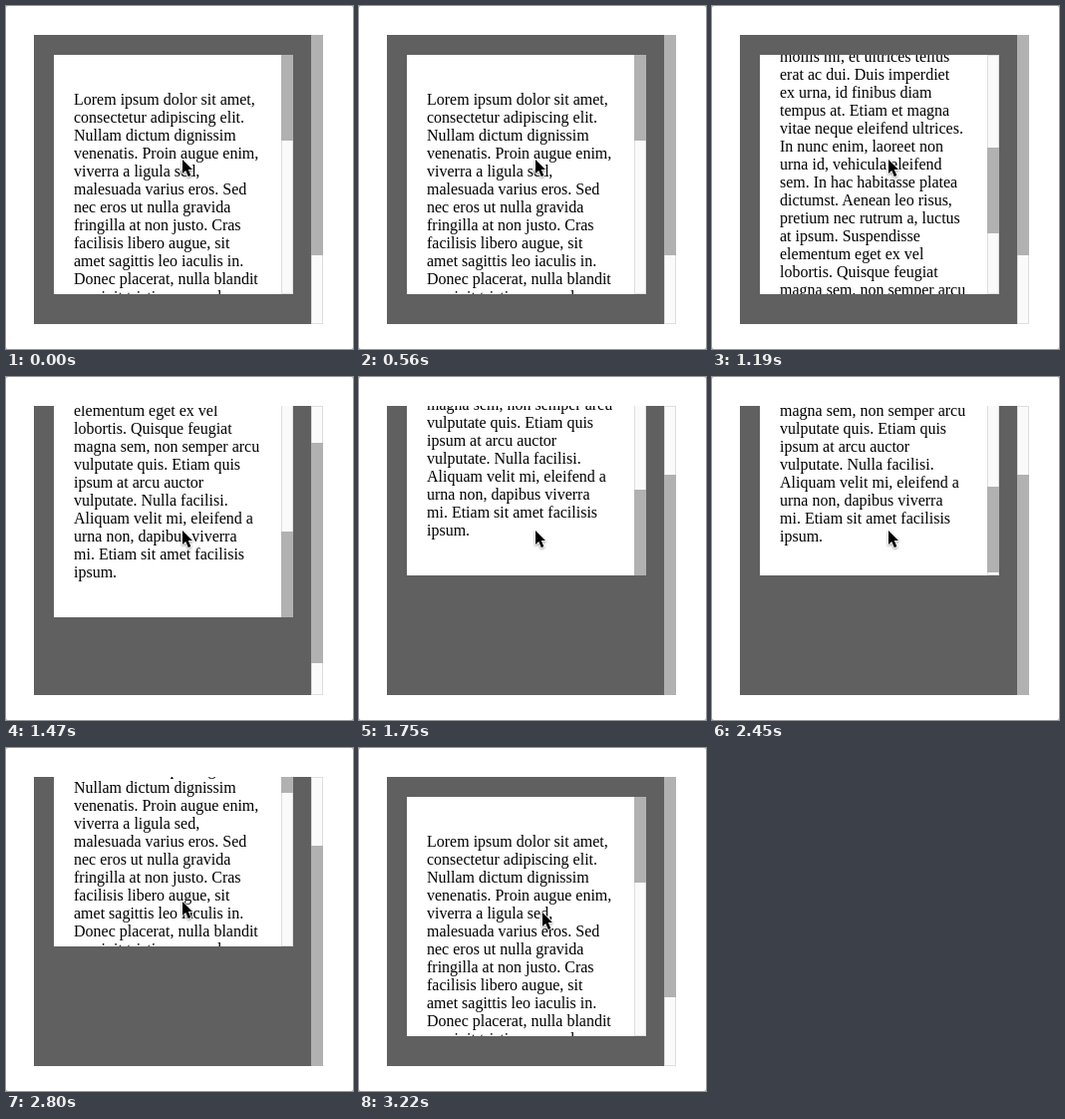
An HTML page for the animation above (3430 ms loop, 348x344 px).

```html
<!DOCTYPE html>
<html lang="la">
<head>
<meta charset="utf-8">
<title>Nested scrolling</title>
<style>
  html, body { margin: 0; width: 100%; height: 100%; overflow: hidden; background: #aaa; }
  #stage { position: relative; width: 348px; height: 344px; background: #fff; border-radius: 2px; overflow: hidden; }
  #stage div { position: absolute; }
  #outer { left: 28px; top: 29px; width: 290px; height: 290px; background: #606060; overflow: hidden; }
  #inner { left: 20px; top: 20px; width: 240px; height: 240px; background: #fff; overflow: hidden; }
  #text { left: 20px; top: 36px; font: 16px/18px "Liberation Serif", Times, serif; color: #000; white-space: pre; }
  .track { right: 0; top: 0; width: 12px; height: 100%; background: #fafafa; box-shadow: inset 0 0 0 1px #dedede; }
  .thumb { left: 0; width: 12px; background: #b1b1b1; }
  #cursor { position: absolute; left: 0; top: 0; overflow: visible; filter: drop-shadow(0 1px 1px #0006); }
</style>
</head>
<body>
<div id="stage">
  <div id="outer">
    <div id="inner">
      <div id="text">Lorem ipsum dolor sit amet,
consectetur adipiscing elit.
Nullam dictum dignissim
venenatis. Proin augue enim,
viverra a ligula sed,
malesuada varius eros. Sed
nec eros ut nulla gravida
fringilla at non justo. Cras
facilisis libero augue, sit
amet sagittis leo iaculis in.
Donec placerat, nulla blandit
suscipit tristique, eros leo
mollis mi, et ultrices tellus
erat ac dui. Duis imperdiet
ex urna, id finibus diam
tempus at. Etiam et magna
vitae neque eleifend ultrices.
In nunc enim, laoreet non
urna id, vehicula eleifend
sem. In hac habitasse platea
dictumst. Aenean leo risus,
pretium nec rutrum a, luctus
at ipsum. Suspendisse
elementum eget ex vel
lobortis. Quisque feugiat
magna sem, non semper arcu
vulputate quis. Etiam quis
ipsum at arcu auctor
vulputate. Nulla facilisi.
Aliquam velit mi, eleifend a
urna non, dapibus viverra
mi. Etiam sit amet facilisis
ipsum.</div>
      <div class="track"><div class="thumb" id="innerThumb"></div></div>
    </div>
    <div class="track"><div class="thumb" id="outerThumb"></div></div>
  </div>
  <svg id="cursor" width="12" height="18">
    <path d="M0 0V14L3.2 11 5.8 17 8.4 15.9 5.8 10H10Z" fill="#000" stroke="#fff" stroke-width="1.6" stroke-linejoin="round" paint-order="stroke"/>
  </svg>
</div>
<script>
  const LOOP = 3430, STEP = 70;
  const INNER = { view: 240, content: 666 };
  const OUTER = { view: 290, content: 380 };
  const innerMax = INNER.content - INNER.view;
  const $ = id => document.getElementById(id);

  // Total scroll distance: the inner box uses it first going down, the outer box takes the rest.
  const down = [0, 16, 75, 165, 259, 344, 406, 448, 474, 490, 502, 510, 516];
  const up = [516, 510, 455, 365, 265, 170, 90, 40, 0];
  const DOWN_START = 910, UP_START = 2380;

  const clamp = (v, lo, hi) => Math.max(lo, Math.min(hi, v));
  const sample = (list, t, start) =>
    list[clamp(Math.floor((t - start) / STEP), 0, list.length - 1)];

  function setThumb(el, box, scroll) {
    const ratio = box.view / box.content;
    el.style.height = Math.floor(box.view * ratio) + 'px';
    el.style.top = Math.round(scroll * ratio) + 'px';
  }

  function draw(t) {
    let innerScroll, outerScroll;
    if (t < UP_START) {
      const total = sample(down, t, DOWN_START);
      innerScroll = Math.min(total, innerMax);
      outerScroll = total - innerScroll;
    } else {
      const total = sample(up, t, UP_START);
      outerScroll = Math.min(total, OUTER.content - OUTER.view);
      innerScroll = total - outerScroll;
    }
    $('text').style.top = 36 - innerScroll + 'px';
    $('inner').style.top = 20 - outerScroll + 'px';
    setThumb($('innerThumb'), INNER, innerScroll);
    setThumb($('outerThumb'), OUTER, outerScroll);

    const drift = clamp((t - 2940) / 280, 0, 1);
    $('cursor').style.transform =
      `translate(${177 + Math.round(7 * drift)}px, ${154 + Math.round(11 * drift)}px)`;
  }

  function tick() {
    const t = (performance.now() + 0.5) % LOOP;
    draw(Math.floor(t / STEP) * STEP);
    requestAnimationFrame(tick);
  }
  tick();
</script>
</body>
</html>
```
